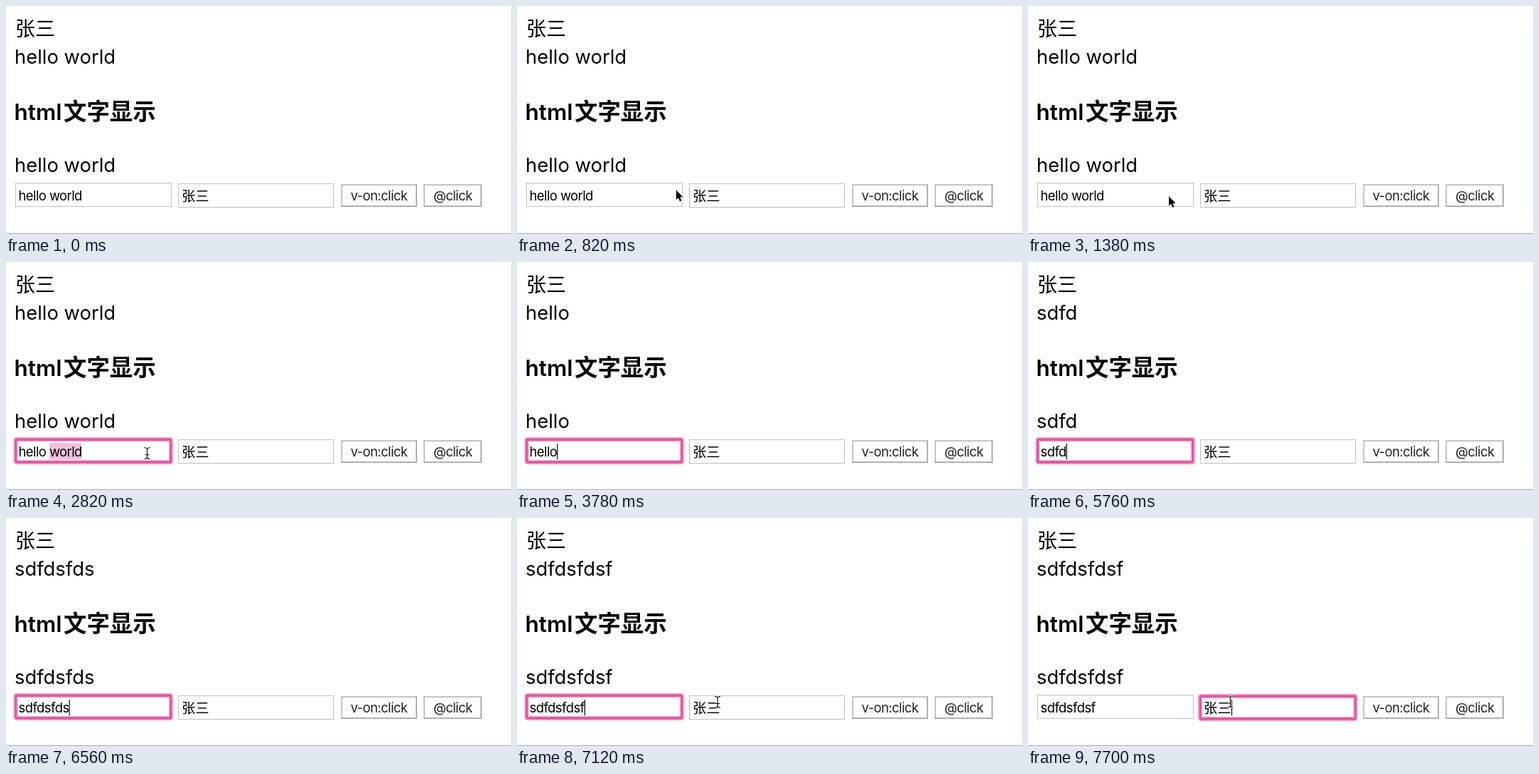
Animation of 710 by 320 pixels, one loop 8 s. Source, as an HTML page:

```html
<!DOCTYPE html>
<html lang="zh-CN">
<head>
<meta charset="utf-8">
<style>
  html, body { margin: 0; width: 100%; height: 100%; overflow: hidden; background: #fff; }
  svg { display: block; }
  text { white-space: pre; font: 27.4px Inter, "Noto Sans CJK SC", sans-serif; }
  .cjk { font: 28px "Noto Sans CJK SC", "Noto Sans CJK JP", sans-serif; }
  .title { font-size: 32.4px; font-weight: 600; }
  .title .latin { font-size: 31.5px; }
  .field { font-size: 18.5px; letter-spacing: -.6px; }
  .cjk.field { font-size: 19.3px; letter-spacing: 0; }
  .button { fill: #222; }
  .box { fill: #fff; stroke: #bfbfbf; }
  .edge { fill: none; stroke: #c4c4c4; stroke-width: 2; }
  .dark { stroke: #b0b0b0; }
</style>
</head>
<body>
<svg width="710" height="320" viewBox="0 0 710 320">
  <text class="cjk" x="13" y="41.5">张三</text>
  <text class="model" x="12" y="81"></text>
  <text class="cjk title" y="160"><tspan class="latin" x="11.5" font-family="Inter, sans-serif">html</tspan><tspan x="81">文字显示</tspan></text>
  <text class="model" x="12" y="233"></text>

  <rect class="box" x="13.5" y="248.5" width="219" height="33"/>
  <rect class="box" x="242.5" y="249.5" width="218" height="33"/>
  <g id="ring">
    <rect x="10" y="245.5" width="225.5" height="39" rx="5" fill="#f1bbd9"/>
    <rect x="12" y="247.3" width="221.5" height="35.4" rx="3" fill="#df5a9f"/>
    <rect x="15.5" y="251" width="214.5" height="28" fill="#efc3dc"/>
    <rect x="17" y="252.5" width="211.5" height="25" fill="#fff"/>
  </g>
  <rect id="selection" x="61" y="254" width="45" height="23" fill="#f0bfdc"/>
  <text id="input" class="model field" x="17.5" y="273"></text>
  <text class="cjk field" x="247" y="273.5">张三</text>
  <path id="caret" d="M0 255V277" stroke="#000" stroke-width="1.2"/>

  <path class="edge" d="M472 282V251H578M588 282V251H669"/>
  <path class="edge dark" d="M471 281H577V250M587 281H668V250"/>
  <text class="field button" x="484.5" y="273">v-on:click</text>
  <text class="field button" x="601" y="273">@click</text>
  <path d="M0 319.5H710" stroke="#aaa"/>

  <path id="arrow" d="M0 0V13.6L3.1 10.8L5.2 15.8L7.6 14.8L5.5 9.9H9.6Z" stroke="#fff" stroke-width="1.2" paint-order="stroke"/>
  <g id="beam" fill="none">
    <path d="M-4 -8Q0 -8 0 -5Q0 -8 4 -8M0 -5V5M-3 2H3M-4 8Q0 8 0 5Q0 8 4 8" stroke="#fff" stroke-width="2.6"/>
    <path d="M-4 -8Q0 -8 0 -5Q0 -8 4 -8M0 -5V5M-3 2H3M-4 8Q0 8 0 5Q0 8 4 8" stroke="#111" stroke-width="1.2"/>
  </g>
</svg>
<script>
const LOOP = 8000;
const FOCUS = 2380, SELECT = 2560, EDIT = 3620, MOVE = 6780, SWITCH = 7700;

// [time, text]
const edits = [
  [0, "hello world"], [EDIT, "hello "], [3760, "hello"], [3860, "hell"], [3940, "hel"],
  [4020, "he"], [4100, "h"], [4180, ""], [4340, "s"], [4480, "sd"], [4740, "sdf"],
  [5440, "sdfd"], [5880, "sdfds"], [6040, "sdfdsf"], [6440, "sdfdsfd"],
  [6540, "sdfdsfds"], [6620, "sdfdsfdsf"]
];

// [time, x, y]
const arrowPath = [[420, 254, 242], [700, 228, 256], [1140, 205, 269], [1240, 205, 267], [1360, 198, 267]];
const beamPath = [[2220, 198.5, 268.5], [MOVE, 198.5, 268.5], [7160, 284.5, 258]];

const $ = id => document.getElementById(id);
const [ring, selection, input, caret, arrow, beam] =
  ["ring", "selection", "input", "caret", "arrow", "beam"].map($);
const models = document.querySelectorAll(".model");

const show = (el, on) => el.setAttribute("visibility", on ? "visible" : "hidden");
const place = (el, x, y) => el.setAttribute("transform", `translate(${x} ${y})`);

function along(path, t) {
  const next = path.findIndex(p => p[0] > t);
  if (next < 1) return (next ? path.at(-1) : path[0]).slice(1);
  const [t0, x0, y0] = path[next - 1], [t1, x1, y1] = path[next];
  const u = (t - t0) / (t1 - t0), k = u * u * (3 - 2 * u);
  return [x0 + (x1 - x0) * k, y0 + (y1 - y0) * k];
}

function draw(now) {
  const t = now % LOOP;
  const value = edits.findLast(e => e[0] <= t)[1];
  models.forEach(m => { if (m.textContent !== value) m.textContent = value; });

  const second = t >= SWITCH;
  show(ring, t >= FOCUS);
  place(ring, second ? 228.5 : 0, second ? 1 : 0);

  const selected = t >= SELECT && t < EDIT;
  show(selection, selected);
  show(caret, t >= FOCUS && !selected);
  place(caret, second ? 286.5 : 18 + (value ? input.getComputedTextLength() : 0), 0);

  show(arrow, t >= 420 && t < 2220);
  place(arrow, ...along(arrowPath, t));
  show(beam, t >= 2220 && (t < EDIT || t >= MOVE));
  place(beam, ...along(beamPath, t));
  requestAnimationFrame(() => draw(performance.now() - start));
}

const start = performance.now();
draw(0);
</script>
</body>
</html>
```
